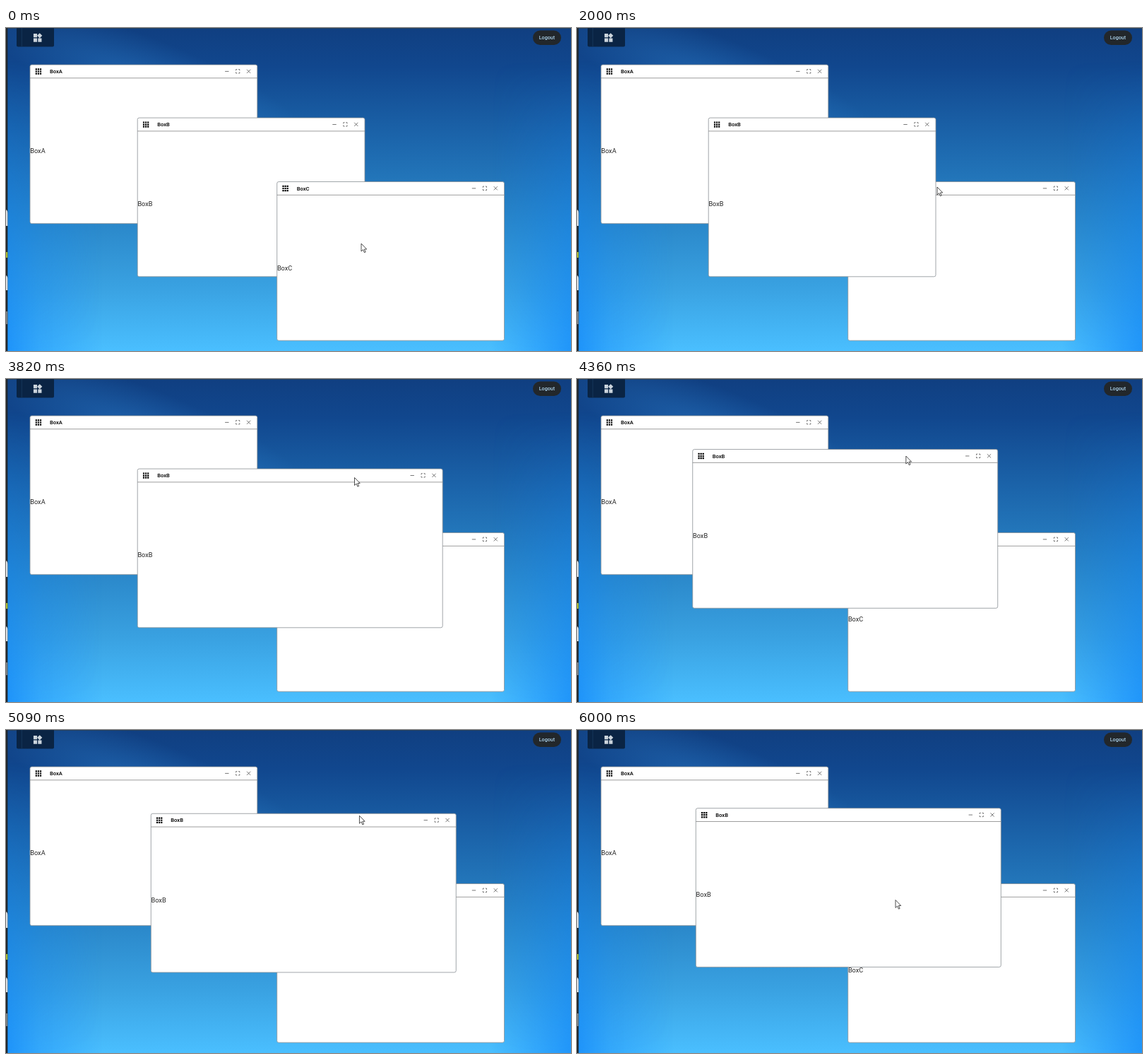
Write an HTML page that moves like this. It is 800 px wide and 457 px high and loops after 6090 ms.

```html
<!DOCTYPE html>
<html lang="en">
<head>
<meta charset="utf-8">
<title>Draggable windows</title>
<style>
  html, body { margin: 0; width: 100%; height: 100%; overflow: hidden; background: #1b5fa8; }
  svg { display: block; width: 100%; height: 100%; }
  text { font-family: Roboto, "Open Sans", sans-serif; }
  .title { font-size: 7.6px; font-weight: 500; fill: #000; }
  .body { font-size: 9.15px; fill: #222; letter-spacing: .05px; }
  .frame { fill: #fff; stroke: #8a9095; stroke-width: .8; }
  .rule { stroke: #858585; stroke-width: .8; }
  .tools { fill: none; stroke: #555; stroke-width: .8; }
</style>
</head>
<body>
<svg viewBox="0 0 800 457" preserveAspectRatio="none">
  <defs>
    <linearGradient id="sky" x2="0" y2="1">
      <stop offset="0" stop-color="#103f81"/>
      <stop offset=".12" stop-color="#11478e"/>
      <stop offset=".35" stop-color="#1c66ac"/>
      <stop offset=".6" stop-color="#2a87c9"/>
      <stop offset=".8" stop-color="#39a1e1"/>
      <stop offset="1" stop-color="#4abfff"/>
    </linearGradient>
    <linearGradient id="sides">
      <stop offset="0" stop-color="#0a80f8" stop-opacity=".7"/>
      <stop offset=".06" stop-color="#0a80f8" stop-opacity=".35"/>
      <stop offset=".17" stop-color="#0a80f8" stop-opacity="0"/>
      <stop offset=".86" stop-color="#0a80f8" stop-opacity="0"/>
      <stop offset="1" stop-color="#0a80f8" stop-opacity=".65"/>
    </linearGradient>
    <linearGradient id="fade" x2="0" y2="1">
      <stop offset=".1" stop-color="#000"/>
      <stop offset="1" stop-color="#fff"/>
    </linearGradient>
    <mask id="low"><rect width="800" height="457" fill="url(#fade)"/></mask>
    <radialGradient id="glow">
      <stop offset="0" stop-color="#3a9ae8" stop-opacity=".3"/>
      <stop offset="1" stop-color="#3a9ae8" stop-opacity="0"/>
    </radialGradient>
  </defs>

  <rect width="800" height="457" fill="url(#sky)"/>
  <rect width="800" height="457" fill="url(#sides)" mask="url(#low)"/>
  <ellipse cx="200" cy="75" rx="260" ry="60" fill="url(#glow)" transform="rotate(22 200 75)"/>
  <rect width="800" height="1" fill="#26405c"/>

  <!-- sliver of the neighbouring desktop -->
  <rect width="2.3" height="457" fill="#20262b"/>
  <path d="M0 257q2.3 1 2.3 5v18H0zM0 350q2.3 1 2.3 5v16H0z" fill="#d9dcde"/>
  <path d="M0 317h2.3v8H0z" fill="#a6b52c"/>
  <path d="M0 401h2.3v18H0z" fill="#777d80"/>

  <path d="M15 0H68V24.5q0 2-2 2H17q-2 0-2-2Z" fill="#0a2444"/>
  <path d="M22.3 0V26.5" stroke="#183a60" stroke-width=".8"/>
  <path transform="translate(37 6.2) scale(.64)" fill="#cbd4dc"
    d="M13 13h8v8h-8zM3 13h8v8h-8zM3 3h8v8h-8zM16.7 1.7l5.6 5.6-5.6 5.7L11 7.3z"/>
  <rect x="746" y="3.5" width="40" height="20.5" rx="10.2" fill="#22272b"/>
  <text x="766" y="16.3" text-anchor="middle" font-size="7.2" font-weight="500" fill="#a9cfe8">Logout</text>

  <g id="desk"></g>
  <path id="cursor" d="M0 0V11L2.6 8.6 4.4 12.7 6.1 12 4.4 8H7.7Z"
    fill="#fff" stroke="#222" stroke-width=".8" stroke-linejoin="round"/>
</svg>
<script>
const LOOP = 6090, TICKS = 67, TICK = LOOP / TICKS;
const WIDTH = 321.8, HEIGHT = 224.7, STRETCH = 110.2;
const HOME = [186.2, 127.1];
const RAISE = 9, GRAB = 43, SWIRL = 51, DROP = 64;

const desk = document.getElementById("desk");
const cursor = document.getElementById("cursor");

const progress = (n, from, to) => Math.min(1, Math.max(0, (n - from) / (to - from)));
const smooth = u => u * u * (3 - 2 * u);
const lerp = (a, b, u) => a + (b - a) * u;
const mix = (p, q, u) => p.map((v, i) => lerp(v, q[i], u));
const moveTo = (node, x, y) => node.setAttribute("transform", `translate(${x} ${y})`);

// A shrinking counter-clockwise spiral, slow at both ends.
function spiral(t) {
  const deg = lerp(-95, 540, t) - 35 * Math.sin(2 * Math.PI * t);
  const a = deg * Math.PI / 180;
  return [
    168.3 + 12 * Math.sin(Math.PI * t) + lerp(48, 6, t) * Math.sin(a),
    136.5 + lerp(34.3, 25.8, t) * Math.cos(a)
  ];
}

// The drag swings up and left along a curve, then joins the spiral.
function dragAt(n) {
  if (n >= SWIRL) return spiral(progress(n, SWIRL, DROP));
  const u = progress(n, GRAB, SWIRL) ** 2.56, bend = [146.8, 60.2];
  return mix(mix(HOME, bend, u), mix(bend, spiral(0), u), u);
}

const stretchAt = n => STRETCH * smooth(progress(n, 30, 37.85));

// Moves: start, end, target
const moves = [
  [0, 6, [424, 134]],
  [9, 12, [528, 205]],
  [12, 15, [510, 225]],
  [23, 25, [500.5, 223.5]],
  [25, 26, [511.5, 225]],
  [28.5, 36.35, [621.7, 230]],
  [36.35, 40, [493.5, 139.5]]
];

function cursorAt(n) {
  let p = [503, 305];
  for (const [from, to, target] of moves) p = mix(p, target, smooth(progress(n, from, to)));
  // The pointer runs slightly ahead of the window it drags.
  const held = dragAt(n + .45);
  p = p.map((v, i) => v + held[i] - HOME[i]);
  return mix(p, [451, 240.5], smooth(progress(n, DROP, DROP + 2)));
}

function dots() {
  let d = "";
  for (let i = 0; i < 9; i++) d += `M${7.7 + i % 3 * 3.1} ${5.3 + Math.floor(i / 3) * 3.1}h2.2v2.2h-2.2z`;
  return d;
}

function makeWindow(name, x, y) {
  const g = document.createElementNS("http://www.w3.org/2000/svg", "g");
  g.innerHTML = `<rect class="frame" height="${HEIGHT}" rx="2.5"/>
    <path class="rule"/>
    <path d="${dots()}"/>
    <text class="title" x="28" y="12.2">${name}</text>
    <text class="body" x="0.2" y="125.3">${name}</text>
    <path class="tools" d="M-45.7 9.4h5.4M-30.2 8.3v-1.7h1.7M-26.7 6.6h1.7v1.7M-25 10.3v1.7h-1.7M-28.5 12h-1.7v-1.7M-14.8 6.7l5.2 5.2M-9.6 6.7l-5.2 5.2"/>`;
  desk.append(g);
  const [frame, rule, tools] = ["frame", "rule", "tools"].map(c => g.querySelector("." + c));
  function place(x, y, w) {
    moveTo(g, x, y);
    frame.setAttribute("width", w);
    rule.setAttribute("d", `M0 18.8H${w}`);
    moveTo(tools, w, 0);
  }
  place(x, y, WIDTH);
  return { g, place };
}

makeWindow("BoxA", 34, 52);
const boxB = makeWindow("BoxB", ...HOME);
const boxC = makeWindow("BoxC", 383.7, 217.5);

function draw(ms) {
  const n = Math.min(TICKS - 1, Math.floor((ms % LOOP + 5) / TICK));
  const top = n >= RAISE ? boxB : boxC;
  if (desk.lastChild !== top.g) desk.append(top.g);
  boxB.place(...dragAt(n), WIDTH + stretchAt(n));
  moveTo(cursor, ...cursorAt(n));
}

let start;
function loop(now) {
  start ??= now;
  draw(now - start);
  requestAnimationFrame(loop);
}
draw(0);
requestAnimationFrame(loop);
</script>
</body>
</html>
```
